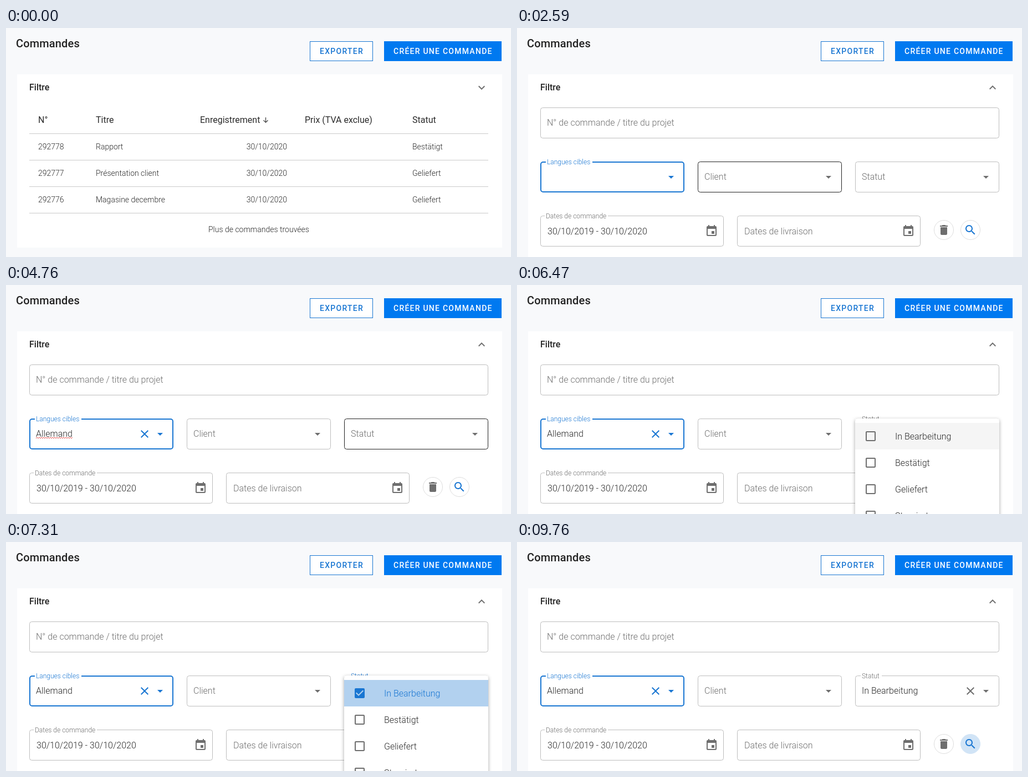
These frames come from a looping animation (911x415 px, 9.88 s). An HTML page:

```html
<!DOCTYPE html>
<html lang="fr">
<head>
<meta charset="utf-8">
<title>Commandes</title>
<style>
html, body { margin: 0; width: 100%; height: 100%; overflow: hidden; background: #f8f9fb; }
svg { display: block; width: 911px; height: 415px; font-family: Roboto, sans-serif; }
text { white-space: pre; }
</style>
</head>
<body>
<svg id="stage" viewBox="0 0 911 415" width="911" height="415"></svg>
<script>
const LOOP = 9880, STEP = 120;
const BUSY = [[1870, 2830], [3070, 3790], [4040, 4760], [5130, 5850], [6470, 7310], [8060, 8420], [9040, 9760]];
const BLUE = '#1976d2', INK = '#2b2b2b', GREY = '#6e6e6e', LINE = '#bdbdbd';
const DETAILS = 300;

const ICONS = {
  chevron: 'M16.59 8.59L12 13.17 7.41 8.59 6 10l6 6 6-6z',
  arrow: 'M7 10l5 5 5-5z',
  close: 'M19 6.41L17.59 5 12 10.59 6.41 5 5 6.41 10.59 12 5 17.59 6.41 19 12 13.41 17.59 19 19 17.59 13.41 12z',
  event: 'M17 12h-5v5h5v-5zM16 1v2H8V1H6v2H5c-1.11 0-1.99.9-1.99 2L3 19c0 1.1.89 2 2 2h14c1.1 0 2-.9 2-2V5c0-1.1-.9-2-2-2h-1V1h-2zm3 18H5V8h14v11z',
  trash: 'M6 19c0 1.1.9 2 2 2h8c1.1 0 2-.9 2-2V7H6v12zM19 4h-3.5l-1-1h-5l-1 1H5v2h14V4z',
  search: 'M15.5 14h-.79l-.28-.27C15.41 12.59 16 11.11 16 9.5 16 5.91 13.09 3 9.5 3S3 5.91 3 9.5 5.91 16 9.5 16c1.61 0 3.09-.59 4.23-1.57l.27.28v.79l5 4.99L20.49 19l-4.99-5zm-6 0C7.01 14 5 11.99 5 9.5S7.01 5 9.5 5 14 7.01 14 9.5 11.99 14 9.5 14z',
  box: 'M19 5v14H5V5h14m0-2H5c-1.1 0-2 .9-2 2v14c0 1.1.9 2 2 2h14c1.1 0 2-.9 2-2V5c0-1.1-.9-2-2-2z',
  checked: 'M19 3H5c-1.11 0-2 .9-2 2v14c0 1.1.89 2 2 2h14c1.11 0 2-.9 2-2V5c0-1.1-.89-2-2-2zm-9 14l-5-5 1.41-1.41L10 14.17l7.59-7.59L19 8l-9 9z'
};

const ramp = (t, from, to) => Math.min(1, Math.max(0, (t - from) / (to - from)));
const smooth = (t, from, to) => { const p = ramp(t, from, to); return p * p * (3 - 2 * p); };
const within = (t, from, to) => t >= from && t < to;
const mix = (a, b, p) => a + (b - a) * p;

const text = (x, y, s, size = 16, weight = 400, fill = INK, extra = '') =>
  `<text x="${x}" y="${y}" font-size="${size}" font-weight="${weight}" fill="${fill}" ${extra}>${s}</text>`;
const rect = (x, y, w, h, fill, extra = '') =>
  `<rect x="${x}" y="${y}" width="${w}" height="${h}" fill="${fill}" ${extra}/>`;
const icon = (name, cx, cy, fill = GREY, turn = 0) =>
  `<path d="${ICONS[name]}" fill="${fill}" transform="translate(${cx} ${cy}) rotate(${turn}) translate(-12 -12)"/>`;
const rule = y => rect(42, y, 828, 1, '#cacaca');

function outline(x, y, w, color = LINE, thick = 1) {
  const o = thick / 2;
  return rect(x + o, y + o, w - thick, 56 - thick, 'none', `rx="4" stroke="${color}" stroke-width="${thick}"`);
}

// Label that slides from inside the field to a notch in its top border.
function label(x, y, s, up, width, color) {
  const notch = up > .5 ? rect(x - 2, y - 1, width + 5, 4, '#fff') : '';
  return notch + text(x, mix(y + 33, y + 5, up), s, mix(16, 12, up), 300, color);
}

function header() {
  return text(18, 35, 'Commandes', 20, 500, '#222', 'letter-spacing=".15"')
    + rect(548.5, 24.5, 113, 35, '#fff', `stroke="${BLUE}"`)
    + text(566, 47, 'EXPORTER', 14, 500, BLUE, 'letter-spacing="1.25"')
    + rect(682, 24, 212, 36, '#0079f0')
    + text(699, 47, 'CRÉER UNE COMMANDE', 14, 500, '#fff', 'letter-spacing="1.25"');
}

function table(dy) {
  const rows = [
    ['292778', 'Rapport', 'Bestätigt'],
    ['292777', 'Présentation client', 'Geliefert'],
    ['292776', 'Magasine decembre', 'Geliefert']
  ];
  const heads = [[58, 'N°'], [162, 'Titre'], [350, 'Enregistrement'], [539, 'Prix (TVA exclue)'], [733, 'Statut']];
  let out = heads.map(([x, s]) => text(x, 172, s)).join('') + rule(191)
    + `<path d="M468.5 162v9M464.5 167.2l4 4 4-4" fill="none" stroke="#444" stroke-width="1.3"/>`;
  rows.forEach(([id, title, status], i) => {
    const y = 220 + 48 * i;
    out += text(58, y, id, 14, 300) + text(162, y, title, 14, 300)
      + text(507, y, '30/10/2020', 14, 300, INK, 'text-anchor="end"')
      + text(733, y, status, 14, 300) + rule(y + 19);
  });
  out += text(365, 370, 'Plus de commandes trouvées', 14, 300);
  return `<g transform="translate(0 ${dy})">${out}</g>`;
}

function languageField(t) {
  const up = smooth(t, 2400, 2560), focus = t >= 2470;
  const open = within(t, 3310, 4040);
  const typed = t < 4040 ? 'All'.slice(0, Math.max(0, Math.floor((t - 3070) / STEP) + 1)) : 'Allemand';
  const color = focus ? BLUE : GREY;
  let out = outline(42, 242, 260, focus ? BLUE : LINE, focus ? 2 : 1)
    + label(54, 242, 'Langues cibles', up, 79, color)
    + icon('arrow', 278, 270, color, open ? 180 : 0);
  if (typed && t >= 3070) out += text(54, 275, typed, 16, 300) + icon('close', 250, 270, BLUE);
  if (within(t, 4280, 5250)) {
    let d = 'M54 278';
    for (let x = 56, k = 0; x <= 120; x += 2, k++) d += `L${x} ${k % 2 ? 278 : 276}`;
    out += `<path d="${d}" fill="none" stroke="#e53935" stroke-width=".9"/>`;
  }
  return out;
}

function languageList(t) {
  if (!within(t, 3310, 4040)) return '';
  return rect(42, 298, 260, 64, '#fff', 'rx="4" filter="url(#shade)"')
    + (t >= 3670 ? rect(42, 306, 260, 48, '#f5f5f5') : '')
    + text(58, 336, 'Allemand', 16, 300);
}

function statusField(t) {
  const up = smooth(t, 5110, 5330), picked = t >= 6830;
  const turn = t < 8060 ? -180 * smooth(t, 5130, 5370) : -180 * (1 - ramp(t, 8060, 8300));
  const color = within(t, 6830, 8060) ? BLUE : GREY;
  const edge = within(t, 4640, 8060) ? '#222' : within(t, 8060, 8300) ? '#858b92' : LINE;
  return outline(610, 242, 260, edge)
    + label(622, 242, 'Statut', up, 33, color)
    + (picked ? text(622, 275, 'In Bearbeitung', 16, 300) + icon('close', 818, 270) : '')
    + icon('arrow', 846, 270, GREY, turn);
}

function statusMenu(t) {
  const grow = smooth(t, 5190, 5450);
  const alpha = grow * (1 - ramp(t, 8000, 8193));
  if (alpha <= 0) return '';
  const picked = t >= 6830;
  let out = rect(610, 242, 260, 230, '#fff', 'rx="4" filter="url(#shade)"');
  if (t >= 6470) out += rect(610, 250, 260, 48, picked ? '#b2d1ef' : '#f5f5f5');
  ['In Bearbeitung', 'Bestätigt', 'Geliefert', 'Storniert'].forEach((s, i) => {
    const y = 274 + 48 * i, on = picked && !i;
    out += icon(on ? 'checked' : 'box', 638, y, on ? BLUE : GREY) + text(682, y + 6, s, 16, 300, on ? BLUE : INK);
  });
  return `<g opacity="${alpha}" transform="translate(740 242) scale(${mix(.75, 1, grow)} ${mix(.56, 1, grow)}) translate(-740 -242)">${out}</g>`;
}

function roundButton(cx, name, color, fill, edge) {
  return `<circle cx="${cx}" cy="366" r="17.5" fill="${fill}" stroke="${edge}"/>` + icon(name, cx, 366, color);
}

function filters(t) {
  const hoverClient = within(t, 2470, 2710) || within(t, 4400, 4640);
  const hot = smooth(t, 9340, 9640);
  const tint = `rgb(${mix(255, 209, hot)},${mix(255, 228, hot)},${mix(255, 246, hot)})`;
  return outline(42, 144, 828) + text(54, 177, 'N° de commande / titre du projet', 16, 300, GREY)
    + languageField(t)
    + outline(326, 242, 260, hoverClient ? '#222' : LINE) + text(338, 275, 'Client', 16, 300, GREY)
    + icon('arrow', 562, 270)
    + statusField(t)
    + outline(42, 340, 331) + label(52, 340, 'Dates de commande', 1, 109, GREY)
    + text(55, 374, '30/10/2019 - 30/10/2020', 16, 300) + icon('event', 351, 368)
    + outline(397, 340, 331) + text(410, 374, 'Dates de livraison', 16, 300, GREY) + icon('event', 706, 368)
    + roundButton(770, 'trash', GREY, '#fff', '#ddd')
    + roundButton(818, 'search', BLUE, tint, hot > .5 ? tint : '#ddd');
}

function snap(t) {
  let at = 0;
  for (const [from, to] of BUSY)
    if (t >= from) at = from + Math.floor((Math.min(t, to) - from) / STEP) * STEP;
  return at;
}

function scene(t) {
  const open = smooth(t, 1840, 2150), dy = DETAILS * open;
  return `<defs><clipPath id="fold"><rect x="20" y="130" width="875" height="${dy}"/></clipPath>
    <filter id="shade" x="-10%" y="-10%" width="120%" height="125%"><feDropShadow dx="0" dy="2" stdDeviation="3" flood-color="#000" flood-opacity=".35"/></filter></defs>`
    + rect(0, 0, 911, 415, '#f8f9fb') + header()
    + rect(20, 84, 875, 314 + dy, '#fff')
    + text(42, 113, 'Filtre', 16, 500, '#222') + icon('chevron', 858, 108, GREY, 180 * open)
    + (open < 1 ? table(dy) : '')
    + `<g clip-path="url(#fold)">${filters(t)}</g>`
    + languageList(t) + statusMenu(t);
}

const stage = document.getElementById('stage');
let shown = -1;
function draw(now) {
  const t = snap(now % LOOP);
  if (t !== shown) stage.innerHTML = scene(shown = t);
}
const start = performance.now();
function tick() {
  draw(performance.now() - start);
  requestAnimationFrame(tick);
}
tick();
</script>
</body>
</html>
```
